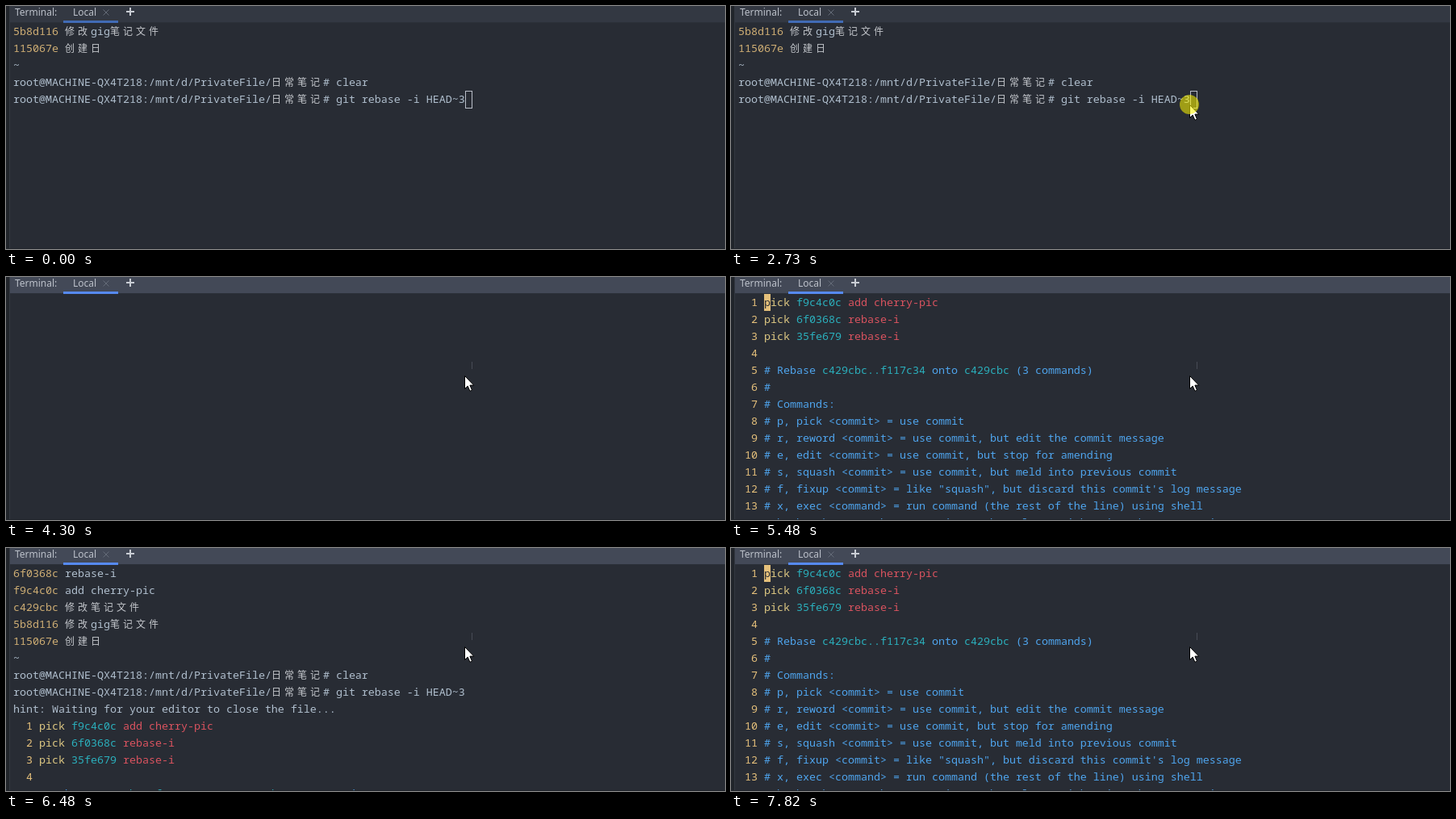
An HTML page for the animation above (8000 ms loop, 891 by 301 pixels).

```html
<!DOCTYPE html>
<html lang="zh-CN">
<head>
<meta charset="utf-8">
<style>
html, body { margin: 0; width: 100%; height: 100%; overflow: hidden; background: #282c34; }
#stage { position: relative; width: 891px; height: 301px; overflow: hidden; background: #282c34; }
#stage > * { position: absolute; }
#side { left: 0; top: 0; width: 4px; height: 301px; background: #21252b; border-right: 1px solid #333841; }
#foot { left: 0; top: 300px; width: 891px; height: 1px; background: #21252b; }
#head { left: 5px; top: 0; width: 886px; height: 20px; background: #333842; border-bottom: 1px solid #2b3038;
  font: 12px/16px "Noto Sans", "Open Sans", sans-serif; color: #bcc1ca; }
#head > * { position: absolute; top: 0; }
#bar { left: 66px; width: 68px; height: 3px; background: #416bb5; }
#head #bar { top: 18px; }
.focus #head { background: #434957; }
.focus #bar { background: #568af2; }
#term { left: 5px; top: 21px; width: 886px; height: 279px; overflow: hidden; color: #b0bfce;
  font: 500 13.3333px/21px "Noto Sans Mono", "DejaVu Sans Mono", monospace; font-variant-ligatures: none; }
#page { position: absolute; left: 4px; top: 0; }
#page div { height: 21px; white-space: pre; }
i { font: 12px/0 "Noto Sans CJK SC", "Noto Sans CJK", sans-serif; letter-spacing: 4px; color: #c4c7cc; }
.h { color: #cfae74; } .n { color: #e5c07b; } .p { color: #dfc983; }
.c { color: #2bb0bd; } .r { color: #d9535f; } .b { color: #4fa5ee; }
#caret { position: absolute; width: 8px; height: 21px; background: #abb2bf; color: #282c34; }
#caret.vim { background: #e5c07b; }
#caret.hollow { width: 7px; height: 20px; background: none; border: 1px solid #b9bec8; }
#trace { left: 577px; top: 105px; width: 1px; height: 9px; background: #474c56; }
#spot { left: 556px; top: 110px; width: 24px; height: 24px; border-radius: 50%; background: rgba(250, 242, 0, .57); }
#mouse { left: 0; top: 0; overflow: visible; }
</style>
</head>
<body>
<div id="stage">
  <div id="side"></div>
  <div id="head">
    <span style="left:6px">Terminal:</span>
    <span style="left:78px">Local</span>
    <svg width="170" height="18" fill="none">
      <path d="M115.5 4.5l7 7m0-7l-7 7" stroke="#646b78"/>
      <path d="M144 7h10m-5-5v10" stroke="#c9cdd4" stroke-width="2"/>
    </svg>
    <div id="bar"></div>
  </div>
  <div id="term"><div id="page"></div></div>
  <div id="foot"></div>
  <div id="trace"></div>
  <svg id="mouse" width="12" height="20">
    <path d="M.5 .5V16.6L4.2 13.1 6.9 19.3 9.5 18.2 6.9 12.1H11.7Z" fill="#fff" stroke="#000"/>
  </svg>
  <div id="spot"></div>
</div>
<script>
const LOOP = 8000, ROW = 21, COL = 8, HISTORY = 3;
const $ = id => document.getElementById(id);
const esc = s => s.replace(/&/g, '&amp;').replace(/</g, '&lt;')
  .replace(/[\u4e00-\u9fff]+/g, '<i>$&</i>');
const span = (cls, s) => `<span class="${cls}">${esc(s)}</span>`;
const log = (hash, msg) => span('h', hash) + ' ' + esc(msg);
const prompt = cmd => esc('root@MACHINE-QX4T218:/mnt/d/PrivateFile/日常笔记# ' + cmd);
const pick = (hash, msg) => span('p', 'pick ') + span('c', hash) + ' ' + span('r', msg);
const note = s => s.split(/([0-9a-f]{7}(?:\.\.[0-9a-f]{7})?)/)
  .map((part, k) => span(k % 2 ? 'c' : 'b', part)).join('');

const shell = [
  log('6f0368c', 'rebase-i'),
  log('f9c4c0c', 'add cherry-pic'),
  log('c429cbc', '修改笔记文件'),
  log('5b8d116', '修改gig笔记文件'),
  log('115067e', '创建日'),
  '~',
  prompt('clear'),
  prompt('git rebase -i HEAD~3'),
  'hint: Waiting for your editor to close the file...'
];
const editor = [
  pick('f9c4c0c', 'add cherry-pic'),
  pick('6f0368c', 'rebase-i'),
  pick('35fe679', 'rebase-i'),
  '',
  ...[
    '# Rebase c429cbc..f117c34 onto c429cbc (3 commands)',
    '#',
    '# Commands:',
    '# p, pick <commit> = use commit',
    '# r, reword <commit> = use commit, but edit the commit message',
    '# e, edit <commit> = use commit, but stop for amending',
    '# s, squash <commit> = use commit, but meld into previous commit',
    '# f, fixup <commit> = like "squash", but discard this commit\'s log message',
    '# x, exec <command> = run command (the rest of the line) using shell',
    '# b, break = stop here (continue rebase later with \'git rebase --continue\')'
  ].map(note)
].map((s, k) => span('n', String(k + 1).padStart(3) + ' ') + s);

$('page').innerHTML = [...shell, ...editor].map(s => `<div>${s}</div>`).join('') + '<div id="caret"></div>';
const rows = [...$('page').children];
const hint = rows[shell.length - 1], editorRows = rows.slice(shell.length, -1);

// Value of the last step that has begun: [start, value]
const at = (steps, t) => steps.reduce((v, s) => t >= s[0] ? s[1] : v, null);

// Top row of the view, counted from the first row shown
const view = [[0, 0], [4300, 6], [6300, 3], [6420, 0], [6480, -3], [7060, 0], [7240, 3], [7820, 6]];
// Caret: row, column, look
const carets = [
  [0, [4, 70, 'hollow']], [2850, [4, 70, '']], [3660, [5, 0, '']], [3890, [5, 51, '']], [4300, null],
  [4480, [6, 4, 'vim']], [4950, null], [5480, [6, 4, 'vim']], [5950, null], [7480, [6, 4, 'vim']]
];
// Pointer: time, x, y
const path = [
  [290, 791, 265], [530, 716, 212], [770, 655, 160], [890, 644, 148], [1010, 649, 147],
  [1360, 649, 147], [1540, 592, 153], [1780, 449, 149], [1960, 515, 132], [2140, 569, 122],
  [2300, 569, 122], [2310, 568, 122]
];

function pointer(t) {
  if (t < 1010) t = 290 + Math.floor((t - 290) / 60) * 60;
  else if (t < 2140) t = 1000 + Math.floor((t - 1000) / 60) * 60;
  const k = path.findIndex(p => p[0] > t);
  if (k < 0) return path[path.length - 1].slice(1);
  const [t0, x0, y0] = path[k - 1], [t1, x1, y1] = path[k];
  const u = Math.max(0, (t - t0) / (t1 - t0));
  return [Math.round(x0 + (x1 - x0) * u), Math.round(y0 + (y1 - y0) * u)];
}

const show = (el, on) => el.style.visibility = on ? 'visible' : 'hidden';

function draw(t) {
  $('stage').className = t >= 2850 ? 'focus' : '';
  $('page').style.top = -(at(view, t) + HISTORY) * ROW + 'px';
  show(hint, t >= 3890);
  editorRows.forEach(r => show(r, t >= 4480));

  const caret = at(carets, t), el = $('caret');
  show(el, caret);
  if (caret) {
    const [row, col, look] = caret;
    el.className = look;
    el.textContent = look === 'vim' ? 'p' : '';
    el.style.left = col * COL + 'px';
    el.style.top = (row + HISTORY) * ROW + 'px';
  }

  show($('trace'), t >= 2850);
  show($('spot'), t >= 2730 && t < 2900);
  show($('mouse'), t >= 290);
  if (t >= 290) {
    const [x, y] = pointer(t);
    $('mouse').style.transform = `translate(${x}px, ${y}px)`;
  }
}

const start = performance.now();
function tick() {
  draw((performance.now() - start) % LOOP);
  requestAnimationFrame(tick);
}
tick();
</script>
</body>
</html>
```
